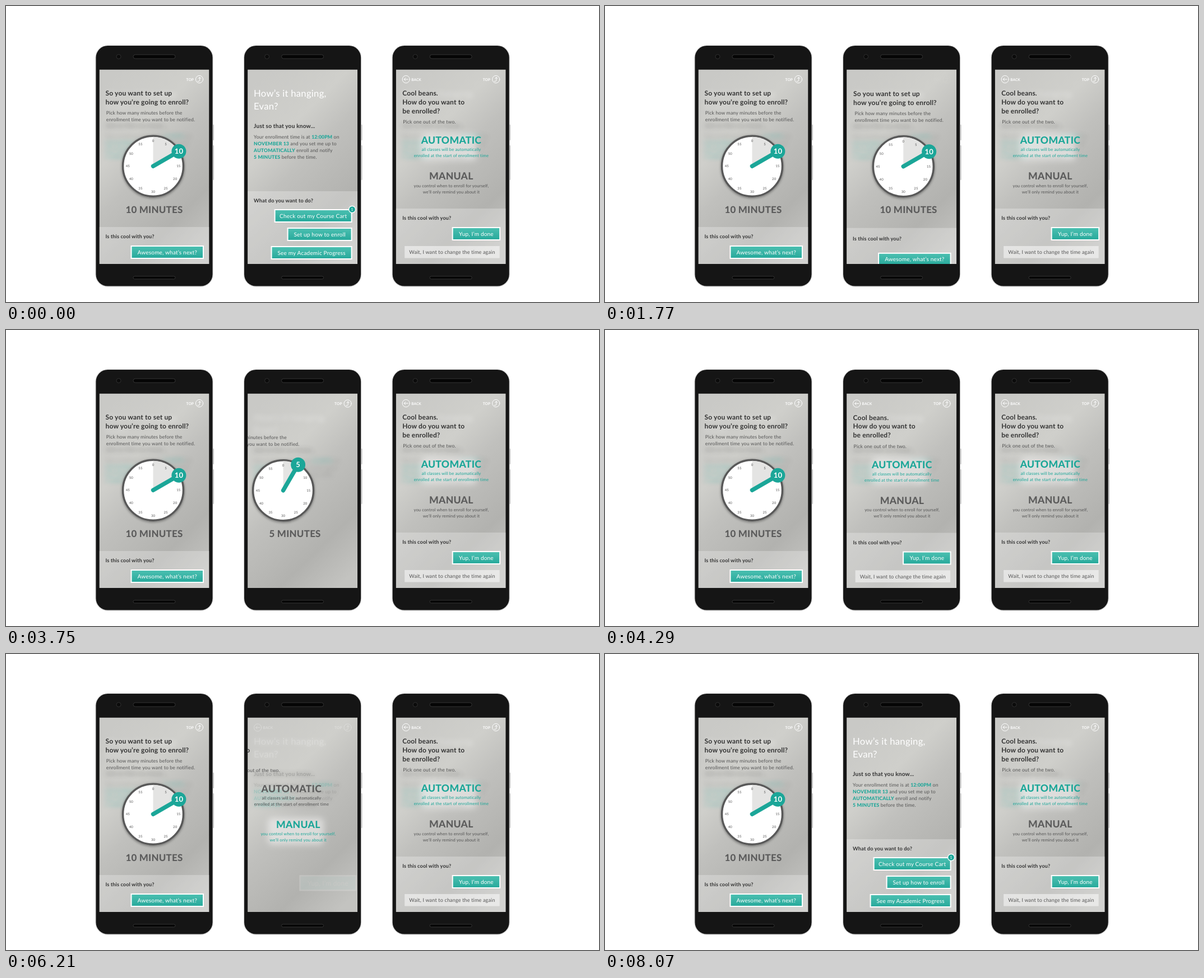
Write an HTML page that moves like this. It is 1058 by 529 pixels and loops after 8.1 s.

```html
<!DOCTYPE html>
<html lang="en">
<head>
<meta charset="utf-8">
<title>Enrollment assistant</title>
<style>
html, body { margin: 0; width: 100%; height: 100%; overflow: hidden; background: #fff; }
svg { display: block; width: 100%; height: 100%; }
text { font-family: Lato, "Open Sans", sans-serif; letter-spacing: .015em; fill: #555; text-rendering: geometricPrecision; }
.bold { font-weight: 700; fill: #333; }
.big { font-weight: 800; fill: #5c5c5c; }
.teal, .teal text, tspan { fill: #1ba698; }
tspan { font-weight: 800; }
.white, .light { fill: #fff; }
.tiny { fill: #fff; font-weight: 700; }
.mid { text-anchor: middle; }
.icon { fill: none; stroke: #fff; stroke-width: 1; stroke-linecap: round; stroke-linejoin: round; }
</style>
</head>
<body>
<svg id="stage" viewBox="0 0 1058 529"></svg>
<script>
const LOOP = 8100, PITCH = 264.6, TEAL = '#1ba698';

const text = (x, y, size, cls, body) =>
  `<text x="${x}" y="${y}" font-size="${size}" class="${cls}">${body}</text>`;
const part = (name, body) => `<g data-part="${name}">${body}</g>`;
const rect = (x, y, w, h, attrs) => `<rect x="${x}" y="${y}" width="${w}" height="${h}" ${attrs}/>`;
const panel = y => rect(166, y, 198, 462 - y, 'fill="#fff" fill-opacity=".25"');
const button = (x, y, label) =>
  rect(x + 1, y + 1, 351 - x, 22, 'fill="url(#teal)" stroke="#fff" stroke-width="2"') +
  rect(x + 1, y + 1, 351 - x, 22, 'class="flash" fill="#fff" opacity="0"') +
  text((x + 353) / 2, y + 15.6, 10.1, 'white mid', label);

const topLink = part('top', text(321.5, 133.6, 6.6, 'tiny', 'TOP') +
  '<g class="icon"><circle cx="345" cy="131" r="6.6"/><path d="M342 134.5h2q1.6 0 1.6-1.6v-5.4m-2.2 2l2.2-2 2.2 2"/></g>');
const backLink = part('back', text(194, 133.6, 6.5, 'tiny', 'BACK') +
  '<g class="icon"><circle cx="184.5" cy="131" r="6.6"/><path d="M188 131h-7m2.6-2.6l-2.6 2.6 2.6 2.6"/></g>');

const homeText = text(177.5, 161.5, 16.7, 'light', 'How’s it hanging,') +
  text(177.5, 184, 16.7, 'light', 'Evan?') +
  text(177.5, 217.3, 10.2, 'bold', 'Just so that you know...') +
  ['Your enrollment time is at <tspan>12:00PM</tspan> on',
   '<tspan>NOVEMBER 13</tspan> and you set me up to',
   '<tspan>AUTOMATICALLY</tspan> enroll and notify',
   '<tspan>5 MINUTES</tspan> before the time.'
  ].map((line, i) => text(177.5, 236 + 12 * i, 8.7, '', line)).join('');
const blurred = part('blurred', `<g filter="url(#soft)">${homeText}</g>`);

const homeActions =
  part('homePanel', panel(330.5)) +
  part('homeAsk', text(177.5, 350, 9.2, 'bold', 'What do you want to do?')) +
  part('progress', button(208, 428.5, 'See my Academic Progress')) +
  part('cart', button(214, 362.5, 'Check out my Course Cart') +
    `<circle cx="353" cy="363" r="6" fill="${TEAL}" stroke="#fff" stroke-width="1.3"/>` +
    text(353, 365.5, 7, 'white mid', '1')) +
  part('enroll', button(237, 395.5, 'Set up how to enroll'));

const polar = (deg, r) => {
  const a = deg * Math.PI / 180;
  return [262.5 + r * Math.sin(a), 286.2 - r * Math.cos(a)].map(v => v.toFixed(2));
};
const dialHand = minutes => {
  const deg = minutes * 6, [x, y] = polar(deg, 53), [ex, ey] = polar(deg, 52.5);
  return `<path d="M262.5 286.2V233.7A52.5 52.5 0 0 1 ${ex} ${ey}Z" fill="#e4e4e3"/>` +
    Array.from({ length: 12 }, (_, i) => {
      const [nx, ny] = polar(i * 30, 45.2);
      return text(nx, +ny + 2.2, 6, 'mid', i * 5);
    }).join('') +
    `<path d="M262.5 286.2L${x} ${y}" stroke="${TEAL}" stroke-width="7.5" stroke-linecap="round"/>` +
    `<circle cx="${x}" cy="${y}" r="13" fill="${TEAL}"/>` +
    text(x, +y + 4.6, 13, 'tiny mid', Math.round(minutes));
};
const minuteLabel = minutes => Math.round(minutes) + ' MINUTES';

const setupScreen =
  part('setupTitle', text(177.5, 160, 12, 'bold', 'So you want to set up') +
    text(177.5, 176, 12, 'bold', 'how you’re going to enroll?')) +
  part('setupSub', text(178.8, 194.2, 8.7, '', 'Pick how many minutes before the') +
    text(178.8, 206.2, 8.7, '', 'enrollment time you want to be notified.')) +
  part('clock', '<circle cx="262.5" cy="286.2" r="54" fill="#fff" stroke="#595959" stroke-width="3.5" filter="url(#shadow)"/>' +
    part('hand', dialHand(10))) +
  part('minutes', text(264.5, 369.8, 16.9, 'big mid', minuteLabel(10))) +
  part('setupPanel', panel(395)) +
  part('setupAsk', text(177.5, 414.8, 9.1, 'bold', 'Is this cool with you?')) +
  part('next', button(222.5, 428, 'Awesome, what’s next?'));

const option = (name, y, title, lines, on) => {
  const words = cls => text(265.2, y, 17.6, 'big mid ' + cls, title) +
    lines.map((line, i) => text(265.2, y + 13.4 + 11 * i, 7.6, 'mid ' + cls, line)).join('');
  return part(name,
    `<g data-part="${name}On" opacity="${on}">` +
    rect(211, y - 18, 100, 48, 'rx="8" fill="#fff" fill-opacity=".48" filter="url(#glow)"') +
    `<g class="teal">${words('teal')}</g></g>` +
    `<g data-part="${name}Off" opacity="${1 - on}">${words('')}</g>`);
};
const modeScreen =
  part('modeTitle', ['Cool beans.', 'How do you want to', 'be enrolled?']
    .map((line, i) => text(178, 160 + 15.8 * i, 12, 'bold', line)).join('')) +
  part('modeSub', text(179, 210.2, 8.7, '', 'Pick one out of the two.')) +
  option('auto', 246, 'AUTOMATIC', ['all classes will be automatically', 'enrolled at the start of enrollment time'], 1) +
  option('manual', 310.3, 'MANUAL', ['you control when to enroll for yourself,', 'we’ll only remind you about it'], 0) +
  part('modePanel', panel(362)) +
  part('modeAsk', text(178, 382.4, 9.1, 'bold', 'Is this cool with you?')) +
  part('wait', rect(182, 429, 169.5, 21.5, 'fill="#fff" fill-opacity=".5"') +
    text(266.8, 443, 9.1, 'mid', 'Wait, I want to change the time again')) +
  part('done', button(266.5, 395, 'Yup, I’m done'));

const phone = (i, content) => `<g transform="translate(${i * PITCH} 0)">` +
  rect(368, 212, 3, 28, 'rx="1" fill="#c4c4c4"') + rect(368, 249, 3, 62, 'rx="1" fill="#c4c4c4"') +
  rect(159.5, 70.2, 210, 431.6, 'rx="22" fill="#c9c9c9"') +
  rect(160.5, 71, 208, 429.6, 'rx="21" fill="#151515"') +
  '<circle cx="201" cy="90.5" r="4" fill="#0b0b0b" stroke="#303030"/>' +
  rect(227, 87, 75, 7, 'rx="3.5" fill="#050505" stroke="#343434"') +
  rect(227, 483, 75, 5, 'rx="2.5" fill="#050505" stroke="#343434"') +
  `<g clip-path="url(#screen)">` + rect(166.5, 113.5, 196, 347.5, 'fill="url(#paper)"') +
  `<g id="phone${i}" transform="translate(0 ${i === 1 ? .5 : 0})">${content}</g></g></g>`;

const stage = document.getElementById('stage');
stage.innerHTML = `<defs>
  <linearGradient id="paper" gradientUnits="userSpaceOnUse" x1="150" y1="165" x2="385" y2="405">
    <stop offset="0" stop-color="#c9c9c6"/><stop offset=".3" stop-color="#cfcfcb"/>
    <stop offset=".48" stop-color="#c0c0bd"/><stop offset=".78" stop-color="#b2b2af"/><stop offset="1" stop-color="#c3c3c0"/>
  </linearGradient>
  <linearGradient id="teal" x2="0" y2="1"><stop stop-color="#4cc0b1"/><stop offset="1" stop-color="#27a99b"/></linearGradient>
  <clipPath id="screen"><rect x="166.5" y="113.5" width="196" height="347.5"/></clipPath>
  <filter id="soft" x="-10%" y="-20%" width="120%" height="140%"><feGaussianBlur stdDeviation="4"/></filter>
  <filter id="glow" x="-30%" y="-50%" width="160%" height="200%"><feGaussianBlur stdDeviation="6"/></filter>
  <filter id="shadow"><feDropShadow dx="0" dy="1.5" stdDeviation="2" flood-opacity=".4"/></filter>
</defs>` +
  phone(0, blurred + setupScreen + topLink) +
  phone(1, blurred + part('homeText', homeText) + homeActions + setupScreen + modeScreen + backLink + topLink +
    '<circle data-part="touch" r="13" fill="#fff"/>') +
  phone(2, blurred + modeScreen + backLink + topLink);

document.querySelectorAll('[data-part=blurred]').forEach(el => el.setAttribute('opacity', .4));

const parts = {};
document.querySelectorAll('#phone1 [data-part]').forEach(el => parts[el.dataset.part] = el);
const marks = document.querySelectorAll('#phone1 [data-part=homeText] tspan');

// part: [axis, distance, enter time, exit time, duration]
const slides = {
  progress: ['y', 140, 6609, 962, 300], cart: ['y', 140, 6508, 1012, 300],
  homeAsk: ['y', 140, 6457, 1062, 300], homePanel: ['y', 140, 6406, 1112, 300],
  enroll: ['y', 140, 6559, 1410, 300],
  setupTitle: ['x', 200, 1420, 3305, 450], setupSub: ['x', 200, 1477, 3362, 450],
  clock: ['x', 200, 1534, 3419, 450], minutes: ['x', 200, 1591, 3476, 450],
  setupPanel: ['y', 80, 1590, 3350, 300], setupAsk: ['y', 80, 1640, 3300, 300],
  next: ['y', 80, 1690, 3750, 300],
  modeTitle: ['x', 200, 3755, 5795, 450], modeSub: ['x', 200, 3780, 5852, 450],
  auto: ['x', 200, 3815, 5909, 450], manual: ['x', 200, 3850, 5966, 450],
  modePanel: ['y', 110, 3755, 5890, 300], modeAsk: ['y', 110, 3775, 5840, 300],
  done: ['y', 110, 3795, 6240, 300], wait: ['y', 110, 3815, 5790, 300]
};
// part: [tap time, centre x, centre y]
const taps = { enroll: [960, 295, 407.5], next: [3300, 287.5, 440], done: [5790, 309.5, 407] };

const ramp = (t, from, to) => Math.min(1, Math.max(0, (t - from) / (to - from)));
const expoIn = p => p <= 0 ? 0 : 2 ** (10 * (p - 1));
const remaining = p => p >= 1 ? 0 : 2 ** (-10 * p);
const smooth = p => p * p * (3 - 2 * p);
const fade = (name, value) => parts[name].setAttribute('opacity', value);

function offset(t, [axis, distance, enter, exit, duration]) {
  const leaving = expoIn(ramp(t, exit, exit + duration));
  const arriving = remaining(ramp(t, enter, enter + duration));
  const away = exit < enter ? Math.min(leaving, arriving) : Math.max(leaving, arriving);
  const d = distance * away * (axis === 'x' && t >= exit ? -1 : 1);
  return axis === 'x' ? `translate(${d} 0)` : `translate(0 ${d})`;
}

function draw(t) {
  for (const name in slides) parts[name].setAttribute('transform', offset(t, slides[name]));

  let touch = 0;
  for (const name in taps) {
    const [tap, x, y] = taps[name], enter = slides[name][2];
    const returned = enter > tap && t >= enter;
    const p = returned ? 0 : ramp(t, tap + 150, tap + 450);
    // A pressed button grows and pales, then fades out.
    fade(name, 1 - ramp(p, .5, 1));
    parts[name].querySelector('.flash').setAttribute('opacity', .85 * p);
    if (p) parts[name].setAttribute('transform', `translate(${x} ${y + 2 * p}) scale(${1 + .2 * p}) translate(${-x} ${-y})`);
    if (t >= tap && t < tap + 180) {
      touch = .3 * (1 - ramp(t, tap + 30, tap + 180));
      parts.touch.setAttribute('transform', `translate(${x} ${y})`);
    }
  }
  fade('touch', touch);

  const clear = 1 - smooth(ramp(t, 1290, 1620)) + smooth(ramp(t, 6100, 6500));
  fade('homeText', clear);
  fade('blurred', .4 * (1 - clear));
  const pulse = 1 - .12 * Math.sin(Math.PI * ramp(t, 6700, 8070)) ** 2;
  marks.forEach(el => el.setAttribute('fill-opacity', pulse));

  const gone = 1 - ramp(t, 6000, 6300);
  fade('top', ramp(t, 1770, 1800) * gone);
  fade('back', ramp(t, 4110, 4290) * gone);

  const minutes = 10 - 5 * smooth(ramp(t, 2280, 2520));
  parts.hand.innerHTML = dialHand(minutes);
  parts.minutes.firstChild.textContent = minuteLabel(minutes);

  const manual = smooth(ramp(t, 4860, 5100));
  fade('autoOn', 1 - manual);
  fade('autoOff', manual);
  fade('manualOn', manual);
  fade('manualOff', 1 - manual);
}

const start = performance.now();
function tick() {
  draw((performance.now() - start) % LOOP);
  requestAnimationFrame(tick);
}
tick();
</script>
</body>
</html>
```
